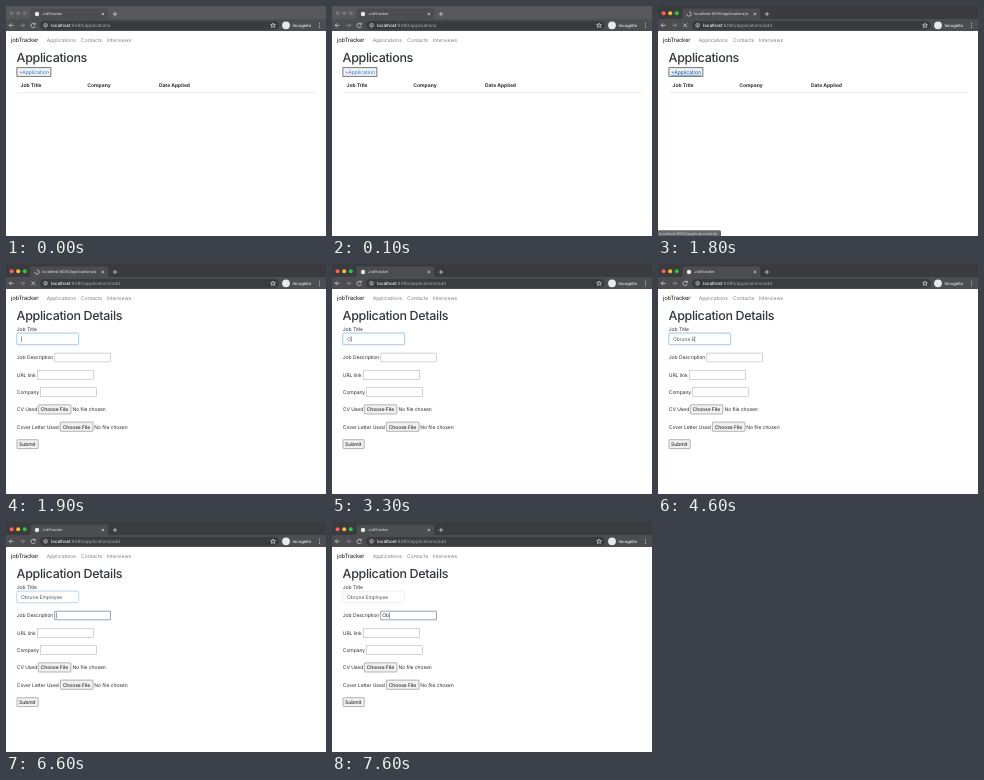
An HTML page for the animation above (8 s loop, 320 by 230 pixels).

```html
<!DOCTYPE html>
<html lang="en">
<head>
<meta charset="utf-8">
<title>jobTracker</title>
<style>
  html, body { margin: 0; width: 100%; height: 100%; overflow: hidden; background: #fff; }
  svg { display: block; width: 100vw; height: 100vh; }
  text { font: 5px Inter, sans-serif; fill: #2b2f33; white-space: pre; text-rendering: geometricPrecision; }
  #formPage text { letter-spacing: -.06px; }
  #formPage .heading, .heading { font-size: 12.5px; font-weight: 500; letter-spacing: -.32px; fill: #33373b; }
  .brand { font-size: 5.9px; letter-spacing: -.2px; fill: #1a1a1a; }
  .nav { fill: #808080; }
  .th { font-weight: 700; letter-spacing: -.02px; }
  .tab { font-size: 3.85px; fill: #e4e5e7; }
  .url { font-size: 4.5px; fill: #a9abaf; }
  .host { fill: #f4f4f5; font-weight: 500; }
  .incognito { font-size: 4.2px; font-weight: 500; fill: #f0f0f1; }
  .status { font-size: 3.8px; fill: #cfd0d2; }
  .typed { fill: #565c62; }
  .label { font-weight: 500; }
  .icon { fill: none; stroke: #dcdde0; stroke-width: .7; }
  .dim { stroke: #96989c; }
  .box { fill: #fff; stroke: #b8b8b8; stroke-width: .6; }
  .button { fill: #f1f1f1; stroke: #969696; stroke-width: .7; }
  .caret { fill: #333; }
</style>
</head>
<body>
<svg viewBox="0 0 320 230" preserveAspectRatio="none">
  <rect width="320" height="230" fill="#fff"/>

  <g id="browser">
    <rect id="strip" width="320" height="14"/>
    <circle class="light" cx="5.6" cy="7.2" r="2"/>
    <circle class="light" cx="12.2" cy="7.2" r="2"/>
    <circle class="light" cx="18.8" cy="7.2" r="2"/>
    <path fill="#4c4d51" d="M0 13H22.5Q24.5 13 24.5 11V4.5Q24.5 2.5 26.5 2.5H100Q102 2.5 102 4.5V11Q102 13 104 13H320V25H0Z"/>
    <circle id="favicon" cx="31" cy="8" r="2.2" fill="#e8e9ea"/>
    <path id="spinner" class="icon" d="M31 5.8A2.2 2.2 0 1 1 28.8 8"/>
    <text id="tabTitle" class="tab" x="36.2" y="9.4"/>
    <path class="icon" d="M95.7 6.8l2.4 2.4m0-2.4l-2.4 2.4M106.8 8h4.4M109 5.8v4.4"/>
    <path class="icon" d="M7.6 19.3H3.2m2-2l-2 2l2 2"/>
    <path class="icon dim" d="M14.2 19.3h4.4m-2-2l2 2l-2 2"/>
    <path id="reload" class="icon" d="M28.8 18A2.2 2.2 0 1 0 29.3 19.8M29.3 16.6v1.7h-1.8"/>
    <path id="stop" class="icon" d="M25.3 17.4l3.8 3.8m0-3.8l-3.8 3.8"/>
    <rect x="34" y="14.9" width="239" height="8.8" rx="4.4" fill="#3a3b3f"/>
    <circle class="icon" cx="39.6" cy="19.3" r="1.8"/>
    <path class="icon" d="M39.6 19v1.3m0-2.2v.4"/>
    <text class="url" x="45" y="20.9"><tspan class="host">localhost</tspan>:8080/applications<tspan id="urlTail"></tspan></text>
    <path class="icon" d="M267 17l.7 1.6 1.7.1-1.3 1.1.4 1.7-1.5-.9-1.5.9.4-1.7-1.3-1.1 1.7-.1z"/>
    <circle cx="280" cy="19.3" r="3.9" fill="#e8e9ea"/>
    <text class="incognito" x="286.6" y="20.9">Incognito</text>
    <path d="M313.5 17.2v.01M313.5 19.3v.01M313.5 21.4v.01" stroke="#dcdde0" stroke-width="1" stroke-linecap="round"/>
  </g>

  <text class="brand" x="5" y="36.4">jobTracker</text>
  <text class="nav" x="40.8" y="36.2">Applications</text>
  <text class="nav" x="75" y="36.2">Contacts</text>
  <text class="nav" x="100.8" y="36.2">Interviews</text>

  <g id="listPage">
    <text class="heading" x="10.6" y="55.6">Applications</text>
    <rect class="button" x="10.9" y="61.7" width="34" height="8.6" style="stroke:#444"/>
    <text id="addLink" x="13.2" y="67.9">+Application</text>
    <text class="th" x="14.5" y="80.6">Job Title</text>
    <text class="th" x="81.3" y="80.6">Company</text>
    <text class="th" x="152.9" y="80.6">Date Applied</text>
    <path d="M11 86.7H309.6" stroke="#e1e4e7" stroke-width=".7"/>
  </g>

  <g id="formPage">
    <text class="heading" x="10.6" y="55.6">Application Details</text>
    <text x="10.8" y="67">Job Title</text>
    <rect id="titleGlow" x="10" y="68.3" width="63.4" height="13.2" rx="1.8" fill="#d3e6fa"/>
    <rect id="titleBox" class="box" x="10.9" y="69.2" width="61.6" height="11.4" rx="1.2"/>
    <text id="titleText" class="typed" x="15" y="76.9"></text>
    <rect id="titleCaret" class="caret" y="72.2" width=".5" height="5.8"/>

    <text x="10.8" y="95.4">Job Description</text>
    <rect id="descBox" class="box" x="48.7" y="89.2" width="55.8" height="8.6" rx=".4"/>
    <text id="descText" x="50.2" y="95.4"></text>
    <rect id="descCaret" class="caret" y="90.5" width=".5" height="6"/>

    <text x="10.8" y="112.7">URL link</text>
    <rect class="box" x="31.3" y="106.5" width="56.2" height="8.8"/>
    <text x="10.8" y="130">Company</text>
    <rect class="box" x="34.3" y="123.7" width="56" height="8.8"/>

    <text x="10.8" y="147.3">CV Used</text>
    <rect class="button" x="32.3" y="140.8" width="32.6" height="9.2" rx=".6"/>
    <text class="label" x="34.6" y="147.3">Choose File</text>
    <text x="66.5" y="147.3">No file chosen</text>
    <text x="10.8" y="164.7">Cover Letter Used</text>
    <rect class="button" x="54.4" y="158.1" width="32.6" height="9.2" rx=".6"/>
    <text class="label" x="56.7" y="164.7">Choose File</text>
    <text x="88.3" y="164.7">No file chosen</text>
    <rect class="button" x="11" y="175.7" width="21.2" height="8.9" rx=".6"/>
    <text class="label" x="13.1" y="181.9">Submit</text>
  </g>

  <g id="statusBar">
    <path d="M0 224.2H61.5Q63 224.2 63 225.7V230H0Z" fill="#66676a"/>
    <text class="status" x="1.2" y="228.5">localhost:8080/applications/add</text>
  </g>
</svg>

<script>
const LOOP = 8000;
const FOCUS = 1000, HOVER = 1500, CLICK = 1700, LOADING = 1800, PAGE = 1900, LOADED = 2000;
const NEXT_FIELD = 6600;

const titleField = {
  name: 'title', x: 15, text: 'Obrune Employee', from: PAGE, to: NEXT_FIELD,
  keys: [3300, 3500, 3600, 3800, 3900, 4000, 4200, 4600, 4900, 5100, 5200, 5400, 5700, 6100, 6300],
  caretOff: [2300, 2800]
};
const descField = {
  name: 'desc', x: 50.2, text: 'Ob', from: NEXT_FIELD, to: LOOP,
  keys: [7400, 7600], caretOff: [7100, 7400]
};

const el = id => document.getElementById(id);
const show = (id, on) => el(id).style.display = on ? '' : 'none';
const within = (t, from, to) => t >= from && t < to;

function drawField(field, t) {
  const label = el(field.name + 'Text');
  const typed = field.text.slice(0, field.keys.filter(k => k <= t).length);
  if (label.textContent !== typed) label.textContent = typed;
  const width = typed ? label.getComputedTextLength() : 0;
  el(field.name + 'Caret').setAttribute('x', field.x + width + .1);
  show(field.name + 'Caret', within(t, field.from, field.to) && !within(t, ...field.caretOff));
}

function drawBrowser(t) {
  const active = t >= FOCUS, loading = within(t, LOADING, LOADED);
  el('strip').style.fill = active ? '#3a3b3f' : '#57585c';
  document.querySelectorAll('.light').forEach((light, i) => {
    light.style.fill = active ? ['#ff5f57', '#febc2e', '#28c840'][i] : '#737478';
  });
  el('tabTitle').textContent = loading ? 'localhost:8080/applications/a' : 'JobTracker';
  el('urlTail').textContent = t >= CLICK ? '/add' : '';
  show('favicon', !loading);
  show('spinner', loading);
  show('reload', !loading);
  show('stop', loading);
  show('statusBar', within(t, CLICK, PAGE));
}

function drawPage(t) {
  const hover = t >= HOVER;
  show('listPage', t < PAGE);
  show('formPage', t >= PAGE);
  el('addLink').style.fill = hover ? '#0056b3' : '#1f82e0';
  el('addLink').style.textDecoration = hover ? 'underline' : 'none';

  // The title's focus ring fades over one step after focus moves on.
  const ring = t < NEXT_FIELD ? 1 : t < NEXT_FIELD + 100 ? .5 : 0;
  el('titleGlow').style.opacity = ring;
  el('titleBox').style.stroke = ring === 1 ? '#8fbaea' : ring ? '#a5c8e0' : '#e3e6e9';
  el('descBox').style.stroke = t >= NEXT_FIELD ? '#416a8c' : '#b8b8b8';
  drawField(titleField, t);
  drawField(descField, t);
}

function frame(now) {
  const t = now % LOOP;
  drawBrowser(t);
  drawPage(t);
  requestAnimationFrame(frame);
}
frame(0);
</script>
</body>
</html>
```
